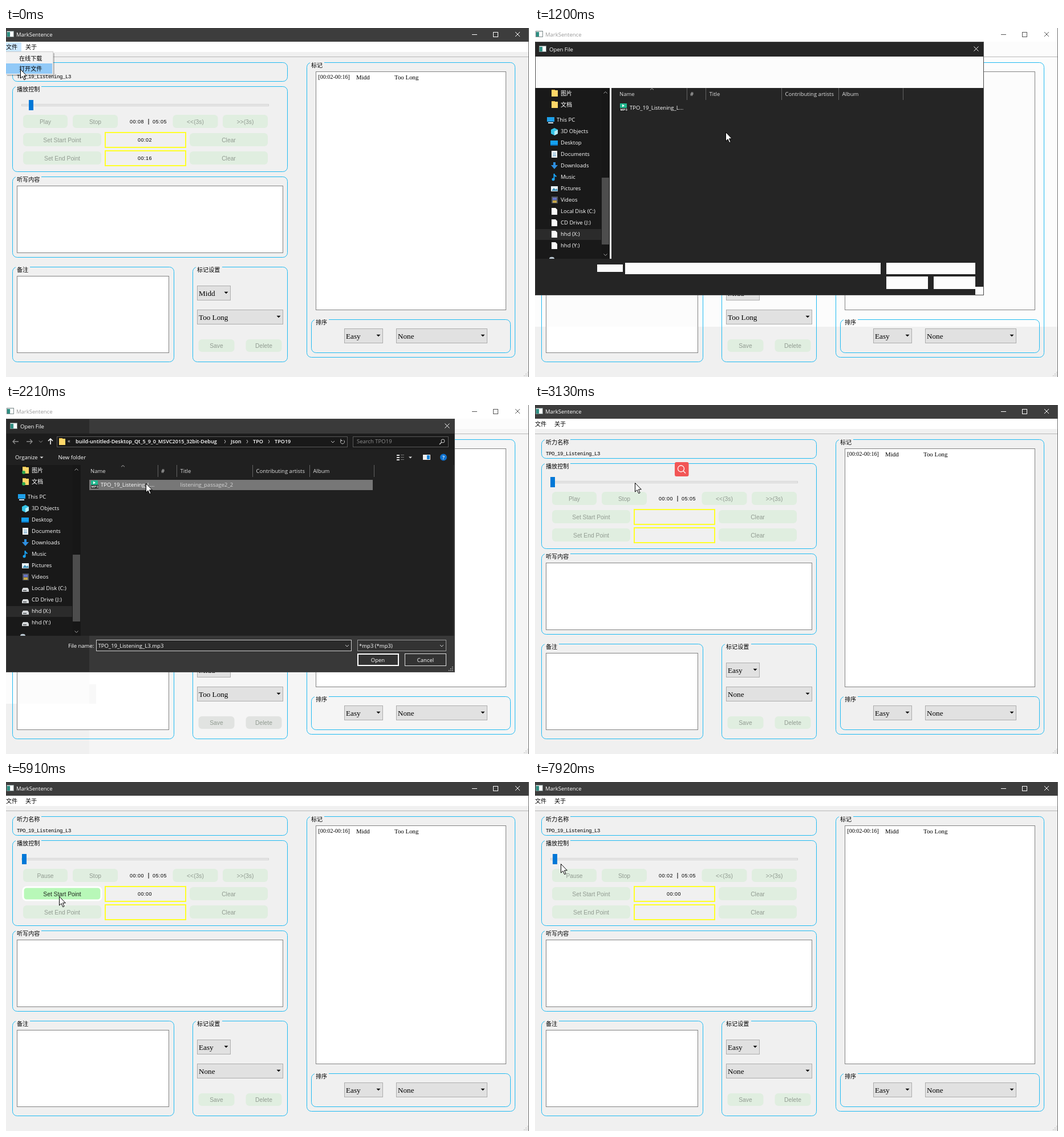
Write an HTML page that moves like this. It is 917 px wide and 611 px high and loops after 8 s.

```html
<!DOCTYPE html>
<html lang="zh">
<head>
<meta charset="utf-8">
<title>MarkSentence</title>
<style>
html, body { margin: 0; width: 100%; height: 100%; overflow: hidden; background: #f0f0f0; }
svg { display: block; width: 100vw; height: 100vh; }
text { white-space: pre; }
.ui { font: 9.5px 'Open Sans', 'Noto Sans CJK SC', 'Noto Sans CJK', sans-serif; }
.crumb { font: 600 9.1px 'Open Sans', sans-serif; }
.cjk { font: 10.1px 'Noto Sans CJK SC', 'Noto Sans CJK', sans-serif; }
.mono { font: 9px 'Liberation Mono', monospace; letter-spacing: -.4px; }
.clock { font: 9px 'Liberation Sans', Arial, sans-serif; letter-spacing: .5px; }
.btn { font: 10.3px 'Liberation Sans', Arial, sans-serif; }
.combo { font: 13.2px 'Liberation Serif', Times, serif; }
.span { font: 9.95px 'Liberation Serif', Times, serif; }
.item { font: 10.9px 'Liberation Serif', Times, serif; }
</style>
</head>
<body>
<svg id="stage" viewBox="0 0 917 611" preserveAspectRatio="none"></svg>
<script>
const LOOP = 8000;
const stage = document.getElementById('stage');

// Pointer moves: start, end, number of steps, target x, target y
const start = [25, 72];
const moves = [
  [510, 840, 4, 309, 158], [960, 1200, 3, 334, 182], [1320, 2110, 8, 245, 137],
  [3130, 3130, 1, 175, 136], [3230, 3830, 6, 70, 162], [4810, 5170, 4, 93, 192],
  [5910, 5910, 1, 93, 200], [6025, 6600, 6, 100, 261], [7440, 7920, 5, 45, 143]
];

function pointer(t) {
  let [x, y] = start;
  for (const [a, b, n, tx, ty] of moves) {
    if (t < a) break;
    const gap = n > 1 ? (b - a) / (n - 1) : 1;
    const p = Math.min(n, Math.floor((t - a) / gap + 1.001)) / n;
    x += (tx - x) * p;
    y += (ty - y) * p;
  }
  return [Math.round(x), Math.round(y)];
}

const attr = o => Object.entries(o).map(([k, v]) => ` ${k}="${v}"`).join('');
const rect = (x, y, w, h, fill, more = {}) =>
  `<rect x="${x}" y="${y}" width="${w}" height="${h}" fill="${fill}"${attr(more)}/>`;
const frame = (x, y, w, h, fill, stroke, more = {}) =>
  rect(x + .5, y + .5, w - 1, h - 1, fill, { stroke, ...more });
const path = (d, stroke, fill = 'none', w = 1) =>
  `<path d="${d}" stroke="${stroke}" fill="${fill}" stroke-width="${w}"/>`;
const text = (x, y, s, cls, fill = '#000', anchor = 'start') =>
  `<text x="${x}" y="${y}" dy=".35em" class="${cls}" fill="${fill}" text-anchor="${anchor}">${s}</text>`;
const down = (x, y, fill, w = 3.5) => path(`M${x - w} ${y - w / 2}h${2 * w}l${-w} ${w}z`, 'none', fill);
const cross = (x, y, c) => path(`M${x - 4} ${y - 4}l8 8m0-8l-8 8`, c);
const chevron = (x, y, c, dx, dy) =>
  path(dx ? `M${x - dx} ${y - 3}l${2 * dx} 3l${-2 * dx} 3` : `M${x - 3} ${y - dy}l3 ${2 * dy}l3 ${-2 * dy}`, c);
const appIcon = (x, y) =>
  rect(x, y, 13, 11, '#e8eeee') + rect(x + 1, y + 2, 5, 8, '#2f8f83') + rect(x + 7, y + 2, 5, 8, '#fff') +
  frame(x, y, 13, 11, 'none', '#7d8a8a');

function group(x, y, r, b, title, gap, bg) {
  return frame(x, y, r - x, b - y, 'none', '#1fbaf2', { rx: 8 }) +
    rect(x + 6, y - 1, gap, 3, bg) + text(x + 8, y + 5, title, 'cjk');
}

function button(x, y, w, h, label, s) {
  const [px, py] = s.pos;
  const hot = s.live && px >= x && px < x + w && py >= y && py < y + h;
  const box = hot
    ? rect(x, y, w, h, '#b8f8b8', { rx: 6, stroke: '#fff', 'stroke-width': 3 })
    : rect(x, y, w, h, s.closing ? '#e1e3e1' : '#e0eee0', { rx: 6 });
  return box + text(x + w / 2, y + h / 2 + .5, label, 'btn', hot ? '#202820' : '#919b91', 'middle');
}

const combo = (x, y, w, label) =>
  frame(x, y, w, 26, '#e1e1e1', '#adadad') + text(x + 3, y + 13.5, label, 'combo') + down(x + w - 8, y + 12.5, '#000');

function titleBar(s) {
  const ink = s.active ? '#fff' : '#555';
  return rect(0, 0, 917, 24, s.active ? '#3d3d3d' : '#fff') + appIcon(1, 5) +
    text(18, 11.5, 'MarkSentence', 'ui', s.active ? '#fff' : '#999') +
    path('M817 11.5h9', ink) + frame(854, 7, 9, 9, 'none', ink) + cross(897, 11, ink);
}

function mainWindow(s) {
  const bg = s.closing ? '#f5f5f5' : '#f0f0f0';
  const pale = '#fcfcfc';
  const top = s.dialog && !s.closing ? pale : bg;
  let o = rect(0, 0, 917, 611, bg);
  if (s.closing) o += rect(0, 523, 146, 88, '#f0f0f0');
  if (s.dialog) o += rect(0, 0, s.closing ? 146 : 917, 523, pale);
  o += titleBar(s) + rect(0, 24, 917, 18, s.dialog ? pale : '#fff');
  if (s.menu) o += rect(0, 25, 27, 16, '#cce8ff');
  const menuInk = s.active ? '#000' : '#989898';
  o += text(0, 33, '文件', 'cjk', menuInk) + text(34, 33, '关于', 'cjk', menuInk) + path('M0 50.5h917', '#b8b8b8');

  o += group(11, 60, 494, 94, '听力名称', 45, top) + text(19, 85, 'TPO_19_Listening_L3', 'mono');

  o += group(11, 102, 494, 252, '播放控制', 45, top);
  o += frame(27, 133, 434, 4, '#e7e7e7', '#d4d4d4') + rect(s.knob, 126, 8, 18, '#0078d7');
  o += button(30, 152, 78, 23, s.playing ? 'Pause' : 'Play', s) + button(117, 152, 79, 23, 'Stop', s);
  o += text(217, 164, s.clock, 'clock') + rect(249.5, 159, 1, 10, '#000') + text(257, 164, '05:05', 'clock');
  o += button(292.5, 152, 79, 23, '&lt;&lt;(3s)', s) + button(380, 152, 79, 23, '&gt;&gt;(3s)', s);
  [['Start', s.from], ['End', s.to]].forEach(([name, value], i) => {
    const y = 184 + 32 * i;
    o += button(30, y, 137, 23, `Set ${name} Point`, s);
    o += rect(174, y - 1, 141, 26, 'none', { stroke: '#ffff28', 'stroke-width': 2 });
    o += text(231, y + 12, value, 'clock') + button(322, y, 137, 23, 'Clear', s);
  });

  o += group(11, 260, 494, 402, '听写内容', 45, top) + frame(19, 276, 467, 118, '#fff', '#828282');

  o += group(11, 418, 295, 585, '备注', 25, top) + frame(19, 434, 267, 135, '#fff', '#828282');
  if (s.dialog && !s.closing) o += rect(20, 435, 265, 88, pale);
  if (s.closing) o += rect(20, 435, 126, 88, pale) + rect(146, 489, 12, 34, '#f8f8f8');

  o += group(327, 418, 494, 585, '标记设置', 46, top);
  o += combo(335, 451, 59, s.fresh ? 'Easy' : 'Midd') + combo(335, 493, 151, s.fresh ? 'None' : 'Too Long');
  o += button(337.5, 545, 63, 22, 'Save', s) + button(420.5, 545, 63, 22, 'Delete', s);

  o += group(527, 60, 893, 577, '标记', 25, top) + frame(543, 76, 334, 418, s.dialog && !s.closing ? pale : '#fff', '#828282');
  o += text(547.5, 86, '[00:02-00:16]', 'span') + text(614, 86, 'Midd', 'item') + text(681, 86, 'Too Long', 'item');
  o += group(535, 510, 885, 569, '排序', 25, top);
  o += combo(593, 526, 68, 'Easy') + combo(684, 526, 160, 'None');
  return o + grip(914, 602, '#c0c0c0') + rect(916, 0, 1, 611, '#707070');
}

function grip(x, y, c) {
  let o = '';
  for (let i = 0; i < 3; i++)
    for (let j = 0; j <= i; j++) o += rect(x - 3 * j, y + 3 * i, 1.5, 1.5, c);
  return o;
}

function menu() {
  return rect(2, 44, 83, 40, '#000', { opacity: .22 }) + frame(-1, 41, 84, 41, '#f2f2f2', '#ccc') +
    rect(0, 62, 81, 18, '#91c9f7') + text(23, 53, '在线下载', 'cjk') + text(23, 71.5, '打开文件', 'cjk');
}

const folder = (x, y) => rect(x, y - 6, 6, 4, '#e8b53c') + rect(x, y - 5, 11, 11, '#ffd769');

function sideIcon(kind, y, loaded) {
  const blue = '#1e9fe8';
  switch (kind) {
    case 'folder':
      return folder(29, y) + (loaded ? `<circle cx="31" cy="${y + 4}" r="3" fill="#2fa84f"/>` : '');
    case 'pc': return rect(21, y - 5, 13, 8, blue) + rect(23, y + 4, 9, 2, '#cfe6f5');
    case 'cube':
      return path(`M34 ${y - 6}l6 3v7l-6 3-6-3v-7z`, 'none', '#35c3e6') + path(`M34 ${y}l6-3v7l-6 3z`, 'none', '#b7ecf7');
    case 'desk': return rect(27, y - 4, 13, 9, '#14a0f0') + rect(27, y + 3, 13, 2, '#0a6fb8');
    case 'doc': return rect(29, y - 6, 10, 12, '#f2f5f7') + path(`M31 ${y - 2}h6m-6 3h6m-6 2h6`, '#5a9cc8');
    case 'load': return path(`M32 ${y - 6}h4v5h4l-6 7-6-7h4z`, 'none', '#2f8fe0');
    case 'note':
      return path(`M33.5 ${y + 4}v-10q0 3 4 5`, '#1aa3f5', 'none', 2) + `<circle cx="32" cy="${y + 4}" r="2.5" fill="#1aa3f5"/>`;
    case 'pic': return rect(28, y - 4, 12, 9, '#e8f2f8') + path(`M29 ${y + 4}l4-5 3 3 2-2 2 4z`, 'none', '#3d8fb5');
    case 'film':
      return rect(29, y - 6, 11, 12, '#54585e') + rect(31, y - 4, 7, 4, '#6674c8') + rect(31, y + 1, 7, 4, '#c6a74a');
    default:
      return loaded
        ? path(`M30 ${y - 1}h8l2 3v4h-12v-4z`, 'none', '#d5d8da') + rect(30, y + 3, 6, 1.5, '#4c5155')
        : path(`M29 ${y - 6}h7l3 3v9h-10z`, 'none', '#fafafa');
  }
}

const places = [
  ['folder', '图片', 114], ['folder', '文档', 134], ['pc', 'This PC', 161], ['cube', '3D Objects'], ['desk', 'Desktop'],
  ['doc', 'Documents'], ['load', 'Downloads'], ['note', 'Music'], ['pic', 'Pictures'], ['film', 'Videos'],
  ['disk', 'Local Disk (C:)'], ['disk', 'CD Drive (J:)'], ['disk', 'hhd (X:)'], ['disk', 'hhd (Y:)']
];

function sidebar(loaded) {
  let o = rect(1, 105, 130, 299, '#191919') + rect(1, 352, 115, 19, '#2b2b2b');
  places.forEach(([kind, name, at], i) => {
    const y = at || 121 + 20 * i;
    o += sideIcon(kind, y, loaded) + text(kind === 'pc' ? 38 : 45, y, name, kind === 'folder' ? 'cjk' : 'ui', '#fff');
  });
  o += path('M25 404a4 3 0 0 1 9 0z', 'none', '#b9c6d0');
  o += rect(117, 105, 14, 299, '#171717') + rect(117, 262, 13, 117, '#4d4d4d');
  return o + chevron(123.5, 113, '#aaa', 0, -1.5) + chevron(123.5, 397, '#aaa', 0, 1.5);
}

function toolbar() {
  const grey = '#8f8f8f', soft = '#c8c8c8';
  let o = rect(1, 50, 786, 28, '#1c1c1c') + rect(1, 78, 786, 27, '#202020');
  o += path('M22 64h-10m4-4l-4 4 4 4', grey, 'none', 1.3) + path('M36 64h10m-4-4l4 4-4 4', grey, 'none', 1.3);
  o += chevron(61, 64, grey, 0, 1.5) + path('M78 69v-10m-4 4l4-4 4 4', '#fff', 'none', 1.5);
  o += frame(89, 55, 510, 19, '#191919', '#595959') + folder(93, 64) + text(108, 63, '«', 'ui', '#ddd');
  const crumbs = [[122, 'build-untitled-Desktop_Qt_5_9_0_MSVC2015_32bit-Debug'], [394, 'Json'], [433, 'TPO'], [471, 'TPO19']];
  crumbs.forEach(([x, s], i) => {
    o += text(x, 63.5, s, 'crumb', '#fff') + (i ? chevron(x - 10, 64, soft, 1, 0) : '');
  });
  o += chevron(573, 64.5, soft, 0, 1.5) + path('M592 61.5a3.5 3.5 0 1 1-4 0m-1-2v3h3', soft);
  o += frame(608, 55, 168, 19, '#191919', '#595959') + text(615, 64, 'Search TPO19', 'ui', '#8d8d8d');
  o += '<circle cx="766" cy="63" r="3" fill="none" stroke="#ccc"/>' + path('M764 65l-4 4', '#ccc', 'none', 1.4);
  o += text(16, 91.5, 'Organize', 'ui', '#fff') + down(62.5, 92, '#ddd', 3) + text(91.5, 91.5, 'New folder', 'ui', '#fff');
  for (let i = 0; i < 3; i++) o += rect(685, 87 + 4 * i, 5, 2, '#ddd') + rect(692, 87 + 4 * i, 6, 1, '#777');
  o += down(709, 92, '#ddd', 3) + rect(731, 87, 13, 9, '#f0f0f0') + rect(738, 88, 5, 7, '#1683d8');
  return o + '<circle cx="767" cy="91.5" r="6" fill="#0f72d0"/>' + text(767, 91.5, '?', 'crumb', '#fff', 'middle');
}

function footer(s) {
  const blocks = [[109, 414, 45, 13], [158, 411, 448, 20], [616, 411, 156, 20], [616, 435, 73, 22], [699, 435, 73, 22], [772, 453, 14, 14]];
  if (!s.loaded) return blocks.map(b => rect(...b, '#fcfcfc')).join('');
  let o = text(109, 421.5, 'File name:', 'ui', '#fff') + frame(158, 411, 448, 20, '#2b2b2b', '#d0d0d0');
  if (s.picked) o += text(161.5, 422, 'TPO_19_Listening_L3.mp3', 'ui', '#fff');
  o += chevron(598, 421.5, '#ccc', 0, 1.5) + frame(616, 411, 156, 20, '#333', '#9b9b9b');
  o += text(619, 421.5, '*mp3 (*mp3)', 'ui', '#fff') + chevron(764, 421.5, '#ccc', 0, 1.5);
  o += rect(617, 436, 71, 20, '#333', { stroke: '#fff', 'stroke-width': 2 }) + frame(699, 435, 73, 22, '#333', '#ddd');
  o += text(652, 446.5, 'Open', 'ui', '#fff', 'middle') + text(735.5, 446.5, 'Cancel', 'ui', '#fff', 'middle');
  return o + grip(782, 458, '#bbb');
}

function fileList(s) {
  let o = rect(s.loaded ? 131 : 134, 105, 653, 299, s.loaded ? '#202020' : '#252525');
  for (const x of [266, 299, 432, 532, 645]) o += rect(x, 105, 1, 21, '#636363');
  const heads = [[148, 'Name'], [272, '#'], [305.5, 'Title'], [438.5, 'Contributing artists'], [538.5, 'Album']];
  for (const [x, h] of heads) o += text(x, 115.5, h, 'ui', '#dedede');
  o += chevron(205, 107, '#aaa', 0, -1.3);
  if (s.picked || s.over) o += rect(146, 131, 497, 18, s.picked ? '#777' : '#4d4d4d');
  o += rect(149, 132, 12, 8, '#22b88f') + path('M153 133.5l4 2.5-4 2.5z', 'none', '#fff') + rect(149, 140, 13, 6, '#111');
  o += `<text x="149.5" y="145.2" font-family="Liberation Sans, sans-serif" font-size="6" font-weight="700" fill="#fff">MP3</text>`;
  o += text(166, 139.5, 'TPO_19_Listening_L...', 'ui', '#fff');
  return o + (s.loaded ? text(305.5, 139.5, 'listening_passage2_2', 'ui', '#d6d6d6') : '');
}

function dialog(s) {
  const dark = s.loaded ? '#2b2b2b' : '#252525';
  let o = rect(0, 24, 787, 444, dark);
  if (s.closing) o += rect(146, 25, 641, 25, '#3a3a3a') + rect(146, 404, 641, 64, '#383838');
  o += appIcon(7, 31) + text(25, 37.5, 'Open File', 'ui', '#fff') + cross(773.5, 36.5, '#fff');
  o += s.loaded ? toolbar() : rect(1, 50, 786, 55, '#fcfcfc') + rect(131, 105, 3, 299, '#fcfcfc');
  return o + fileList(s) + sidebar(s.loaded) + footer(s) + frame(0, 24, 787, 444, 'none', '#4a4a4a');
}

const lookup = () => rect(245, 100, 24.5, 25, '#f25555', { rx: 3 }) +
  '<circle cx="256" cy="111.5" r="5.5" fill="none" stroke="#fff" stroke-width="1.3"/>' + path('M260 115.5l4 4', '#fff', 'none', 1.3);

const arrow = ([x, y]) => `<g transform="translate(${x + .5} ${y + .5})">` +
  path('M0 0V15.5L3.6 12.2L6.2 18.2L8.6 17.2L6 11.3H10.8Z', '#000', '#fff') + '</g>';

function stateAt(t) {
  const between = (a, b) => t >= a && t < b;
  const pos = pointer(t);
  const played = t < 5540 ? 0 : Math.max(0, (t >= 6600 && t < 7440 ? 6600 : t) - 4950) / 1000;
  const fresh = t >= 2450;
  return {
    pos, fresh,
    menu: t < 510,
    active: t < 740 || t >= 2330,
    dialog: between(1080, 2330),
    loaded: t >= 1320,
    over: between(1320, 2330) && pos[1] < 149,
    picked: between(1990, 2330),
    closing: between(2210, 2330),
    live: t >= 2570,
    icon: between(2570, 4450),
    playing: t >= 4570,
    knob: fresh ? 27 + Math.floor(played * 1.39) : 40,
    clock: fresh ? '00:0' + Math.floor(played) : '00:08',
    from: !fresh ? '00:02' : t >= 5540 ? '00:00' : '',
    to: fresh ? '' : '00:16'
  };
}

let shown = '';
function draw(now) {
  const s = stateAt(now % LOOP);
  const key = JSON.stringify(s);
  if (key !== shown) {
    shown = key;
    stage.innerHTML = mainWindow(s) + (s.menu ? menu() : '') + (s.dialog ? dialog(s) : '') +
      (s.icon ? lookup() : '') + arrow(s.pos);
  }
}

const begun = performance.now();
function tick() {
  draw(performance.now() - begun);
  requestAnimationFrame(tick);
}
tick();
</script>
</body>
</html>
```
